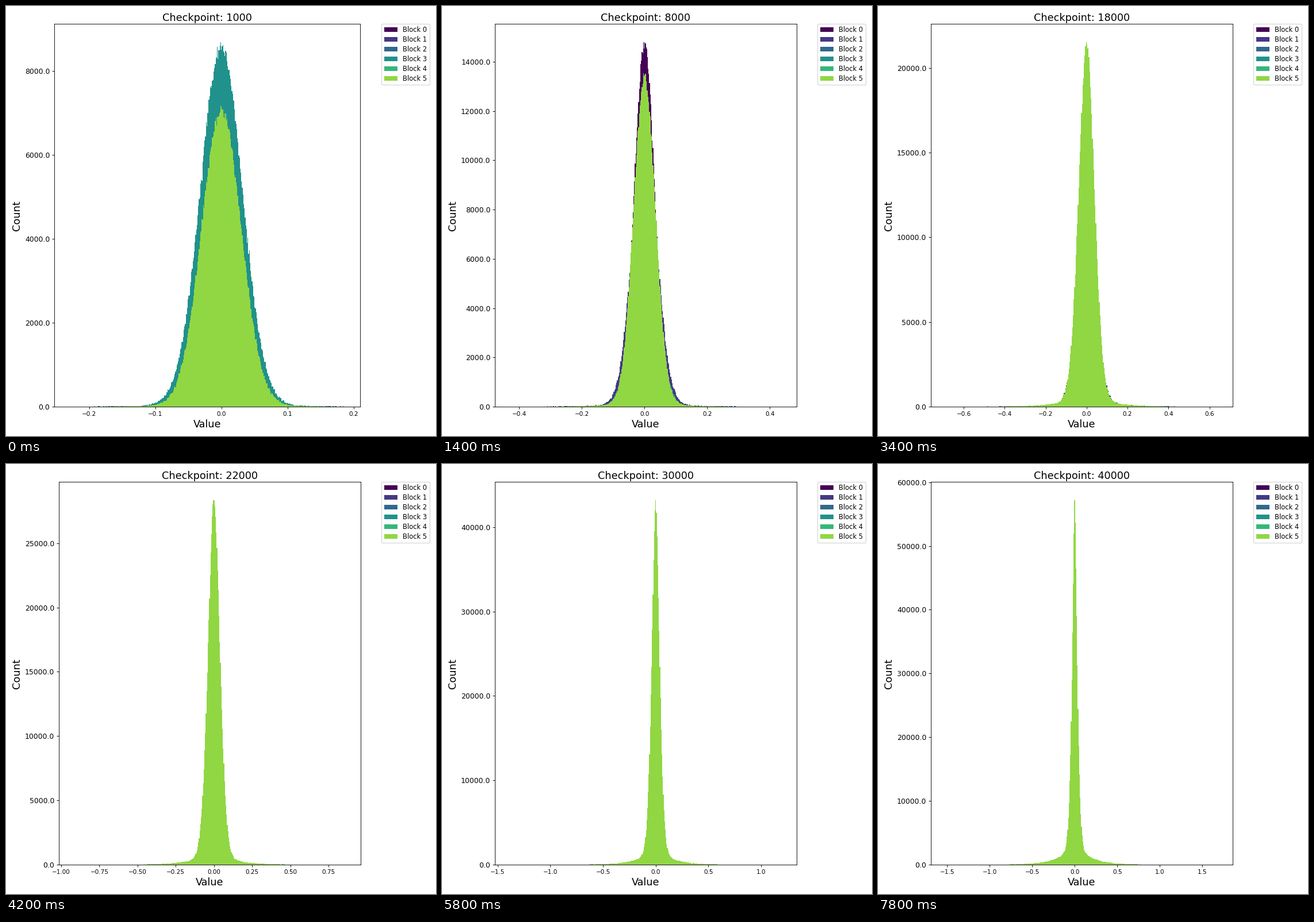
Write a matplotlib script that moves like this. It is 748x748 px and loops after 8 s.

```python
import numpy as np
import matplotlib
import matplotlib.pyplot as plt
from matplotlib.animation import FuncAnimation
from matplotlib.patches import Patch

SIZE, DPI = 748, 88
FRAMES, INTERVAL = 40, 200
BINS = 400
TOP, BOTTOM = 31, 697

# axis range and highest count at a few steps, linear in between
STEPS = (0, 7, 13, 21, 29, 35, 39)
X_MIN = (-0.253, -0.478, -0.5065, -1.015, -1.525, -1.614, -1.69)
X_MAX = (0.21, 0.486, 0.4667, 0.9605, 1.337, 1.551, 1.857)
PEAK = (8690, 14800, 14700, 28350, 43200, 49850, 57200)

LEAD = {3: 0, 0: 7, 2: 13}  # block: step at which it is the tallest
WIDTHS = (0.91, 1.0, 0.95, 1.03, 0.95, 0.97)
COLORS = [matplotlib.colormaps["viridis"](i / 6) for i in range(6)]


def pt(px):
    return px * 72 / DPI


def block_height(block, step):
    if block == 5:
        return np.interp(step, (0, 7, 13, 20), (0.825, 0.905, 0.825, 1))
    near = max(0, 1 - abs(step - LEAD[block]) / 7) if block in LEAD else 0.2
    fade = 1 - 0.4 * np.clip((step - 13) / 8, 0, 1)
    return (0.7 + 0.3 * near) * fade


def block_width(block, step):
    swell = 0.12 * np.sin(np.pi * min(step / 21, 1)) if block == 1 else 0
    return WIDTHS[block] + swell


def density(x, step, width):
    """Bell that sharpens over time, on top of a long exponential tail."""
    u = step / (FRAMES - 1)
    x = np.abs(x) / width
    half = 0.0365 + 0.012 * np.sin(np.pi * step / FRAMES) - 0.004 * u
    power = 2 - 0.5 * np.clip((step - 13) / 26, 0, 1)
    weight = 0.02 + 0.04 * u
    core = 2.0 ** -(x / half) ** power
    return (1 - weight) * core + weight * np.exp(-x / (0.05 + 0.13 * u))


plt.rcParams["font.family"] = "DejaVu Sans"
fig = plt.figure(figsize=(SIZE / DPI, SIZE / DPI), dpi=DPI, facecolor="white")
ax = fig.add_axes([0.1, 0.1, 0.8, 0.8])
for spine in ax.spines.values():
    spine.set_linewidth(pt(0.9))
ax.tick_params(length=pt(4), width=pt(0.9), pad=pt(3.7))
ax.tick_params(axis="x", labelsize=pt(10.4))
ax.tick_params(axis="y", labelsize=pt(12.4))
ax.yaxis.set_major_formatter("{x:.1f}")

blocks = [
    ax.stairs(np.zeros(BINS), np.arange(BINS + 1), fill=True, color=c,
              linewidth=0, antialiased=False)
    for c in COLORS
]


def label(x, y, text, **kw):
    return fig.text(x / SIZE, 1 - y / SIZE, text, fontsize=pt(17.7),
                    ha="center", **kw)


title = label(354, 25.5, "")
xlabel = label(354, 733.3, "Value")
label(19, 365, "Count", rotation=90, va="center")

fig.legend(
    handles=[Patch(color=c, label=f"Block {i}", linewidth=0)
             for i, c in enumerate(COLORS)],
    loc="upper left", bbox_to_anchor=(653.4 / SIZE, 1 - TOP / SIZE),
    borderaxespad=0, borderpad=0.36, labelspacing=0.35, handletextpad=0.85,
    fontsize=pt(11.5),
)


def draw(step):
    lo, hi, peak = (np.interp(step, STEPS, row) for row in (X_MIN, X_MAX, PEAK))
    margin = (hi - lo) / 22
    edges = np.linspace(lo + margin, hi - margin, BINS + 1)
    mid = (edges[1:] + edges[:-1]) / 2

    rng = np.random.default_rng(step + 5)
    counts = [
        rng.poisson(peak * block_height(b, step)
                    * density(mid, step, block_width(b, step)))
        for b in range(6)
    ]
    scale = peak / np.max(counts)
    for patch, count in zip(blocks, counts):
        patch.set_data(count * scale, edges, 0)

    # wider tick labels push the axes to the right
    left, right = (92, 617) if peak * 1.05 >= 10000 else (84, 616)
    ax.set_position([left / SIZE, 1 - BOTTOM / SIZE,
                     (right - left) / SIZE, (BOTTOM - TOP) / SIZE])
    ax.set_xlim(lo, hi)
    ax.set_ylim(0, peak * 1.05)
    center = (left + right) / 2 / SIZE
    title.set_x(center)
    xlabel.set_x(center)
    title.set_text(f"Checkpoint: {(step + 1) * 1000}")
    return []


anim = FuncAnimation(fig, draw, frames=FRAMES, init_func=lambda: draw(0),
                     interval=INTERVAL, repeat=True, repeat_delay=0)
plt.show()
```
